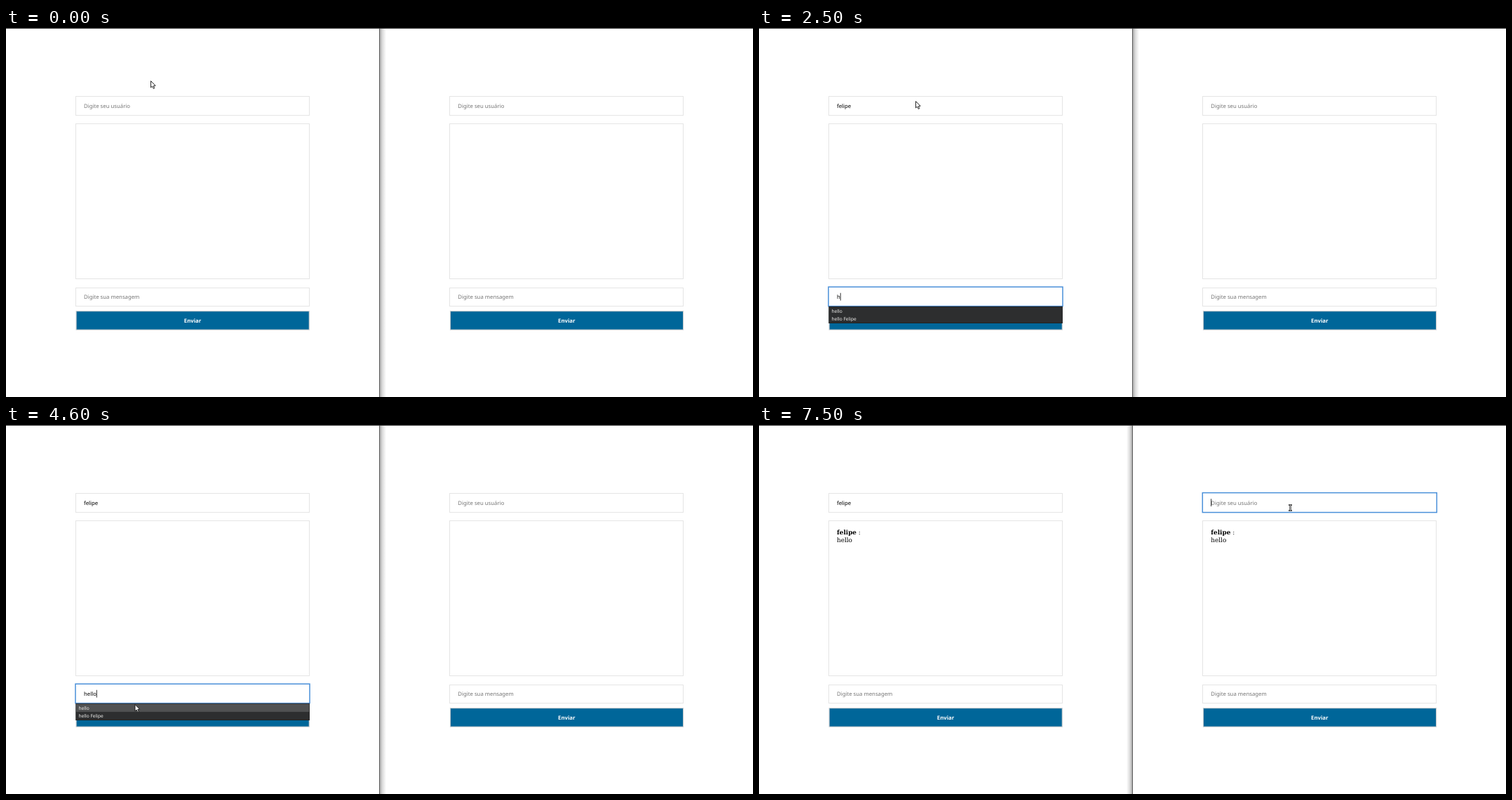
An HTML page with a canvas that plays this animation: 1065 px wide and 526 px high, repeating every 8000 ms.

```html
<!DOCTYPE html>
<html lang="pt">
<head>
<meta charset="utf-8">
<title>Chat</title>
<style>
html, body { margin: 0; width: 100%; height: 100%; overflow: hidden; background: #fff; }
canvas { display: block; width: 100%; height: 100%; }
</style>
</head>
<body>
<canvas id="stage" width="1065" height="526"></canvas>
<script>
const ctx = document.getElementById('stage').getContext('2d');
const W = 1065, H = 526, LOOP = 8000;
const ZOOM = W / 1920;
const PANE = 533.3;
const USER = 'felipe';
const HINTS = ['hello', 'hello Felipe'];
const font = (px, family, weight = 400) => `${weight} ${px * ZOOM}px ${family}`;
const SANS = '"Noto Sans", sans-serif';
const SERIF = '"DejaVu Serif", serif';
const INPUT = font(14, SANS);
const USER_BOX = { y: 97, h: 28, base: 113.5, hint: 'Digite seu usuário' };
const MSG_BOX = { y: 369.5, h: 27.5, base: 386, hint: 'Digite sua mensagem' };

// Each entry changes part of the state from its time on.
const steps = [
  [0, { shape: 'arrow', x: 206.5, y: 75.5, user: '', msg: '', focus: '', caret: true, menu: false, row: -1, sent: false }],
  [400, { x: 210, y: 79.5 }],
  [500, { x: 216, y: 88 }],
  [600, { shape: 'beam', x: 223, y: 101 }],
  [700, { x: 225, y: 106 }],
  [1000, { focus: 'user' }],
  ...[...USER].map((c, i) => [1400 + i * 100, { user: USER.slice(0, i + 1) }]),
  [2100, { focus: 'msg' }],
  [2500, { msg: 'h', menu: true, shape: 'arrow', x: 223.5, y: 104.5 }],
  [2600, { msg: 'he' }],
  [2700, { msg: 'hel' }],
  [3200, { msg: 'hello', caret: false }],
  [3500, { x: 188.5, y: 242.5 }],
  [3900, { x: 165.5, y: 412.5, row: 1 }],
  [4300, { x: 168.5, y: 399, row: 0 }],
  [4600, { x: 184, y: 398.5, caret: true }],
  [5300, { x: 216.5, y: 411, menu: false }],
  [5700, { x: 233.5, y: 418.5, caret: false }],
  [6000, { msg: '', focus: '', sent: true }],
  [6400, { x: 687.5, y: 224.5 }],
  [6800, { shape: 'beam', x: 757.5, y: 118.4 }],
  [7100, { y: 118 }],
  [7500, { focus: 'right', caret: true }]
];

function stateAt(t) {
  const s = {};
  for (const [at, change] of steps) if (at <= t) Object.assign(s, change);
  return s;
}

function rect(x, y, w, h, color) {
  ctx.fillStyle = color;
  ctx.fillRect(x, y, w, h);
}

function text(str, x, y, face, color, align = 'left') {
  ctx.font = face;
  ctx.fillStyle = color;
  ctx.textAlign = align;
  ctx.fillText(str, x, y);
  return ctx.measureText(str).width;
}

function frame(x, y, w, h) {
  ctx.strokeStyle = '#e5e5e5';
  ctx.lineWidth = 1;
  ctx.strokeRect(Math.round(x) + 0.5, Math.round(y) + 0.5, w - 1, h - 1);
}

function field(x, box, value, focused, caret) {
  if (focused) {
    ctx.strokeStyle = '#4a90d9';
    ctx.lineWidth = 1.5;
    ctx.strokeRect(x, box.y - 0.4, 334, box.h);
  } else {
    frame(x, box.y, 334, Math.floor(box.h));
  }
  const w = text(value || box.hint, x + 12, box.base, INPUT, value ? '#000' : '#757575');
  if (focused && caret) rect(x + 12 + (value ? w : 0), box.base - 8.3, 0.8, 10.8, '#000');
}

function pane(x, s, isLeft) {
  const on = name => s.focus === name;
  field(x, USER_BOX, isLeft ? s.user : '', on(isLeft ? 'user' : 'right'), s.caret);
  frame(x, 136, 334, 222);
  if (s.sent) {
    const w = text(USER, x + 12, 156.2, font(16, SERIF, 700), '#000');
    text(' :', x + 12 + w, 156.2, font(16, SERIF), '#000');
    text('hello', x + 12, 166.6, font(16, SERIF), '#000');
  }
  field(x, MSG_BOX, isLeft ? s.msg : '', isLeft && on('msg'), s.caret);
  rect(x + 0.6, 403.1, 333.2, 27.6, '#c4c9cd');
  rect(x + 1.7, 404.2, 331, 25.4, '#006699');
  text('Enviar', x + 167, 420.4, font(14, SANS, 700), '#fff', 'center');
}

function menu(row) {
  rect(99.3, 396.8, 333.6, 24.2, '#1b1c1d');
  rect(100, 397.5, 332.2, 22.8, '#2d2e2f');
  HINTS.forEach((hint, i) => {
    const y = 397.5 + i * 11.3;
    if (i === row) rect(100, y, 332.2, 11.4, '#505152');
    text(hint, 103.4, y + 8.5, font(12, SANS), '#eeeeec');
  });
}

function divider(rightActive) {
  const edge = rightActive ? 532 : 533, reach = rightActive ? -8 : 9;
  const g = ctx.createLinearGradient(edge, 0, edge + reach, 0);
  g.addColorStop(0, 'rgba(0,0,0,.32)');
  g.addColorStop(0.4, 'rgba(0,0,0,.14)');
  g.addColorStop(1, 'rgba(0,0,0,0)');
  rect(Math.min(edge, edge + reach), 0, Math.abs(reach), H, g);
  rect(532, 0, 1, H, '#5a5a5a');
  rect(0, 0, W, 1, '#363636');
}

function arrow() {
  const p = [[0, 0], [0, 9.4], [2.2, 7.5], [3.7, 10.9], [5.3, 10.2], [3.8, 7], [6.6, 6.7]];
  ctx.beginPath();
  p.forEach(([x, y]) => ctx.lineTo(x, y));
  ctx.closePath();
  ctx.fillStyle = '#fff';
  ctx.fill();
  ctx.strokeStyle = '#111';
  ctx.lineWidth = 0.9;
  ctx.stroke();
}

function beam() {
  rect(-2.5, -4.8, 5, 1.6, '#333');
  rect(-2.5, 3.2, 5, 1.6, '#333');
  rect(-1.2, -4, 2.4, 8, '#333');
  rect(-0.4, -4, 0.8, 8, '#ddd');
}

function draw(t) {
  const s = stateAt(t);
  rect(0, 0, W, H, '#fff');
  divider(s.focus === 'right');
  pane(99, s, true);
  pane(99 + PANE, s, false);
  if (s.menu) menu(s.row);
  ctx.save();
  ctx.translate(s.x, s.y);
  s.shape === 'arrow' ? arrow() : beam();
  ctx.restore();
}

ctx.textRendering = 'geometricPrecision';
const start = performance.now();
function tick() {
  draw((performance.now() - start) % LOOP);
  requestAnimationFrame(tick);
}
tick();
</script>
</body>
</html>
```
